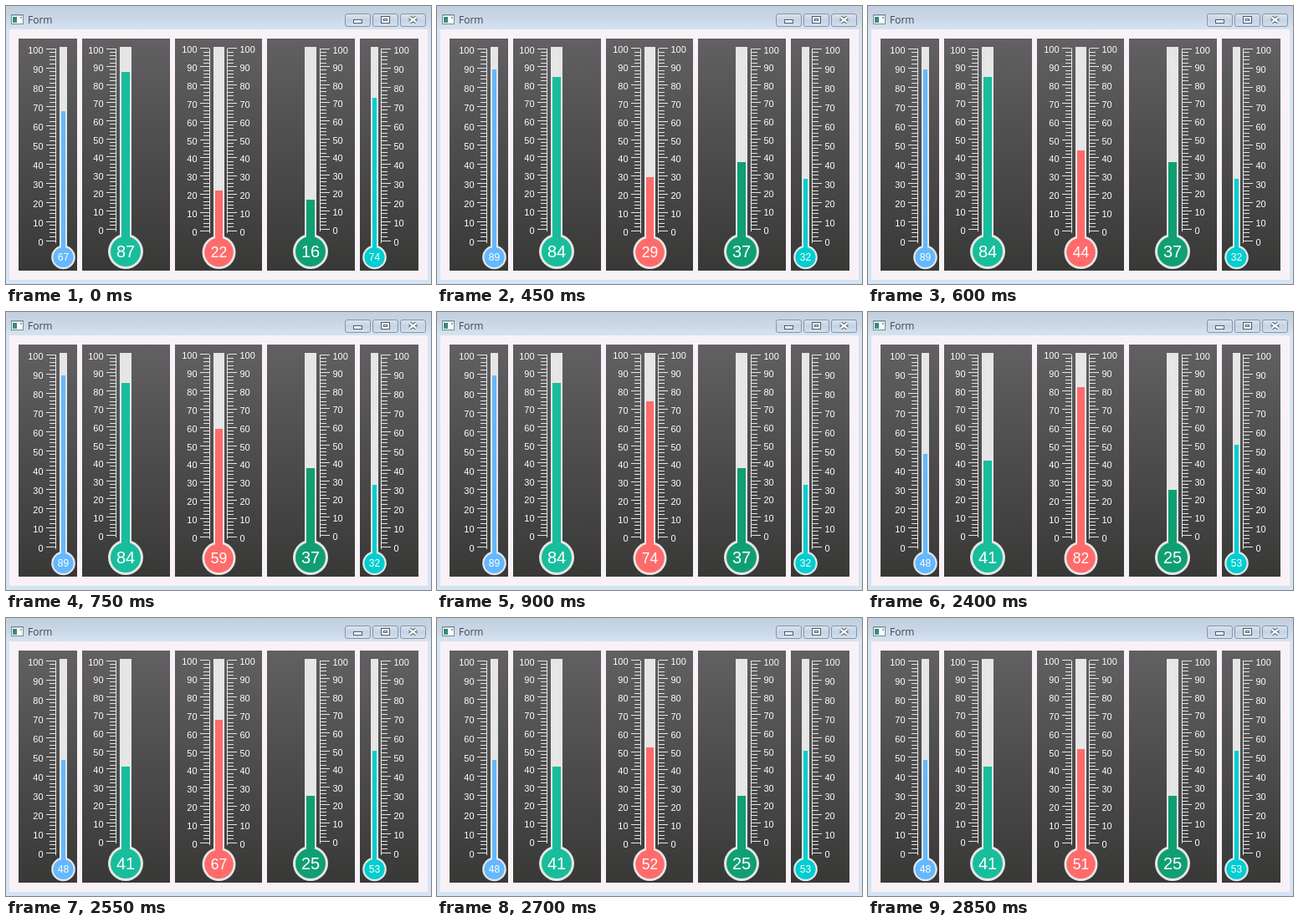
Write an HTML page with a canvas that moves like this. It is 508 px wide and 333 px high and loops after 3.3 s.

```html
<!DOCTYPE html>
<html>
<head>
<meta charset="utf-8">
<style>
html, body { margin: 0; width: 100%; height: 100%; overflow: hidden; }
canvas { display: block; }
</style>
</head>
<body>
<canvas id="stage" width="508" height="333"></canvas>
<script>
const ctx = document.getElementById('stage').getContext('2d');
const LOOP = 3300, STEP = 150, TOP = 49;
const SANS = '"Liberation Sans", Arial, sans-serif';

// zero: y of value 0, unit: pixels per value, left/right: ruler line positions
const gauges = [
  { x: 15, w: 70, tube: 64, tw: 9, zero: 281, unit: 2.3, left: 59, cy: 301, r: 14.3, rim: 2.2, font: 12, color: '#64b8ff' },
  { x: 91, w: 105, tube: 136, tw: 14, zero: 267, unit: 2.16, left: 131, cy: 294, r: 21, rim: 3, font: 20, color: '#18bd9b' },
  { x: 202, w: 104, tube: 248, tw: 13, zero: 269, unit: 2.18, left: 243, right: 264, cy: 295, r: 20, rim: 2.7, font: 17.5, color: '#ff6b6b' },
  { x: 312, w: 105, tube: 357, tw: 14, zero: 267, unit: 2.16, right: 375, cy: 294, r: 21, rim: 3, font: 20, color: '#109f72' },
  { x: 423, w: 70, tube: 436, tw: 9, zero: 281, unit: 2.3, right: 448, cy: 301, r: 14.3, rim: 2.2, font: 12, color: '#00ced1' }
];

function rect(x, y, w, h, fill) {
  ctx.fillStyle = fill;
  ctx.fillRect(x, y, w, h);
}

function disc(x, y, r, fill) {
  ctx.fillStyle = fill;
  ctx.beginPath();
  ctx.arc(x, y, r, 0, 2 * Math.PI);
  ctx.fill();
}

function text(s, x, y, font, align, fill) {
  ctx.font = font;
  ctx.textAlign = align;
  ctx.fillStyle = fill;
  ctx.fillText(s, x, y);
}

function fade(y0, y1, ...colors) {
  const g = ctx.createLinearGradient(0, y0, 0, y1);
  colors.forEach((c, i) => g.addColorStop(i / (colors.length - 1), c));
  return g;
}

function button(x, w) {
  ctx.beginPath();
  ctx.roundRect(x + .5, 9.5, w - 1, 15, 2.5);
  ctx.fillStyle = fade(9, 25, '#dde6f1', '#c5d3e4', '#d6e2f0');
  ctx.fill();
  ctx.strokeStyle = '#8995a8';
  ctx.lineWidth = 1;
  ctx.stroke();
}

function box(x, y, w, h) {
  rect(x, y, w, h, '#505a6b');
  rect(x + 1, y + 1, w - 2, h - 2, '#fff');
}

function cross(width, color) {
  ctx.strokeStyle = color;
  ctx.lineWidth = width;
  ctx.beginPath();
  ctx.moveTo(482.5, 13.5);
  ctx.lineTo(490.5, 19.5);
  ctx.moveTo(490.5, 13.5);
  ctx.lineTo(482.5, 19.5);
  ctx.stroke();
}

function drawWindow() {
  rect(0, 0, 508, 333, '#d5e4f4');
  rect(0, 0, 508, 28, fade(0, 28, '#c1cfdf', '#c9d6e5', '#d6e3f1'));
  rect(4, 28, 500, 300, '#f8f2f7');

  rect(6, 10, 15, 12, '#7c8791');
  rect(7, 11, 13, 10, '#fff');
  rect(7, 11, 13, 1, '#b4c3d2');
  rect(8, 13, 5, 7, fade(13, 20, '#2f7f93', '#3f9a62'));
  rect(17, 13, 2, 2, '#7aa6c8');
  text('Form', 26, 21, '12px "Open Sans", sans-serif', 'left', '#454550');

  button(405, 31);
  button(438, 31);
  button(471, 31);
  box(415, 16, 11, 5);
  box(448, 12, 11, 9);
  box(451, 15, 5, 3);
  cross(4.5, '#505a6b');
  cross(2.2, '#fff');
}

function drawRuler(g, x, side) {
  const ink = '#e6e6e6';
  rect(x, 51, 1, g.zero - 48, ink);
  for (let v = 0; v <= 100; v += 2) {
    const y = Math.floor(g.zero - v * g.unit);
    const len = v % 10 ? 7 : 11;
    rect(side < 0 ? x - len : x + 1, y, len, 1, ink);
    if (v % 10 === 0)
      text(v, x + side * 15 + .5, y + 6, '11px ' + SANS, side < 0 ? 'right' : 'left', '#fff');
  }
}

function drawGauge(g, value) {
  const cx = g.tube + g.tw / 2;
  const top = Math.floor(g.zero - value * g.unit);
  rect(g.x, 39, g.w, 278, fade(39, 317, '#626062', '#4c4c4c', '#383937'));
  if (g.left) drawRuler(g, g.left, -1);
  if (g.right) drawRuler(g, g.right, 1);
  rect(g.tube, TOP, g.tw, g.cy - TOP, '#e6e6e6');
  disc(cx, g.cy, g.r, '#e6e6e6');
  rect(g.tube + 2, top, g.tw - 4, g.cy - top, g.color);
  disc(cx, g.cy, g.r - g.rim, g.color);
  text(value, cx, g.cy + g.font * .35, g.font + 'px ' + SANS, 'center', '#fff');
}

// The red gauge climbs and falls 15 per step; the others jump.
function valuesAt(t) {
  const steps = from => 15 * Math.floor((t - from) / STEP);
  if (t < 450) return [67, 87, 22, 16, 74];
  if (t < 2400) return [89, 84, Math.min(85, 29 + steps(450)), 37, 32];
  return [48, 41, Math.max(51, 82 - steps(2400)), 25, 53];
}

function frame() {
  const values = valuesAt(performance.now() % LOOP);
  drawWindow();
  gauges.forEach((g, i) => drawGauge(g, values[i]));
  requestAnimationFrame(frame);
}
frame();
</script>
</body>
</html>
```
